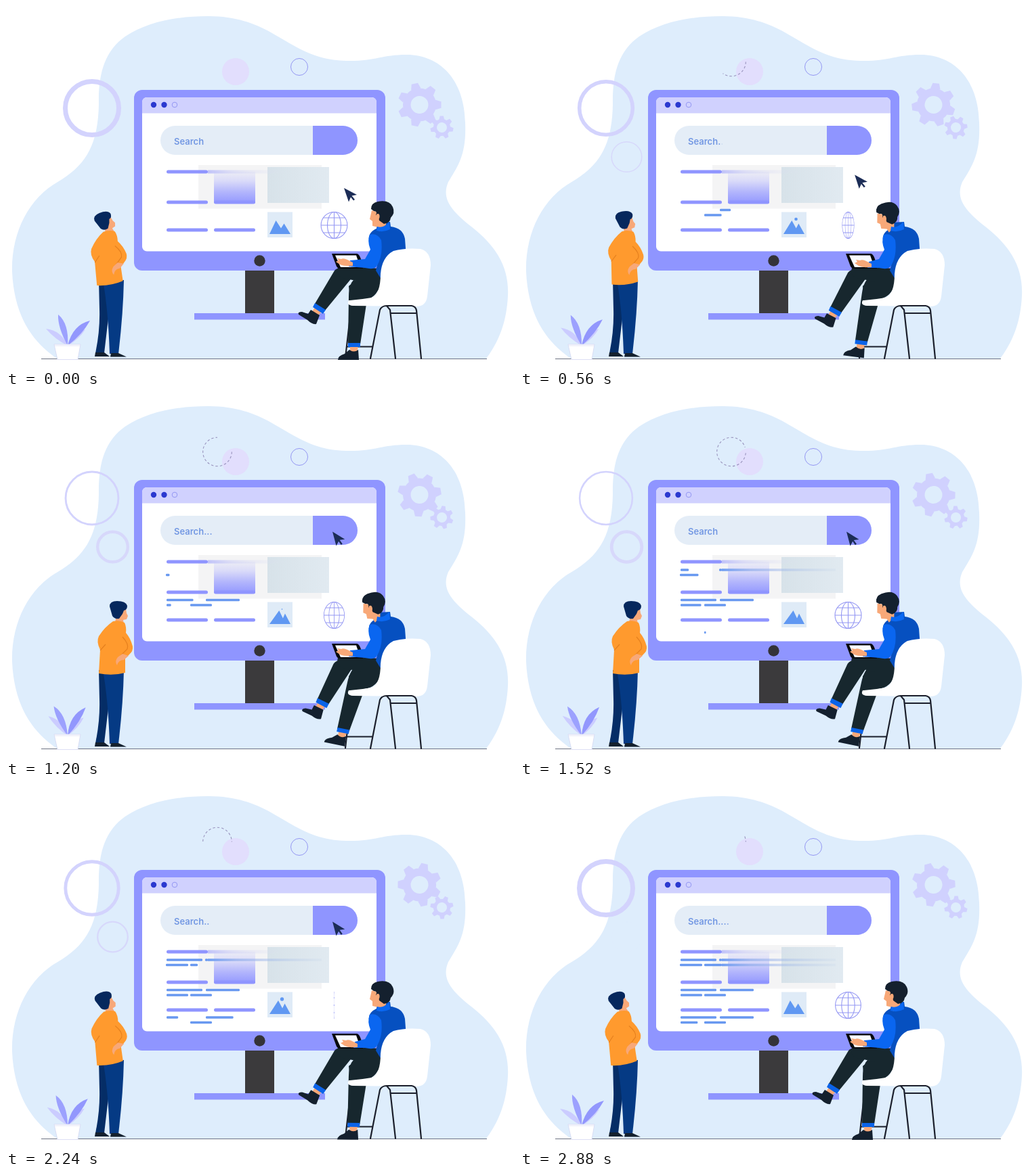
Recreate the animation shown at these times as an HTML page. Size 750 by 535 pixels, loop 2960 ms.

```html
<!DOCTYPE html>
<html lang="en">
<head>
<meta charset="utf-8">
<title>Search illustration</title>
<style>
  html, body { margin: 0; width: 100%; height: 100%; overflow: hidden; background: #fff; }
  svg { display: block; width: 100vw; height: 100vh; }
  .violet { fill: #8f95ff; }
  .lilac { fill: #d0d1fe; }
  .pants { fill: #17272e; }
  .skin { fill: #f8a878; }
  .dark { fill: #14202e; }
  .outline { fill: none; stroke: #9497f3; }
  .frame { fill: none; stroke: #1b1f2b; stroke-width: 2.2; stroke-linecap: round; }
  text { font: 600 13px Inter, "Open Sans", sans-serif; fill: #7398e3; }
</style>
</head>
<body>
<svg viewBox="0 0 750 535">
  <defs>
    <linearGradient id="card" x1="0" y1="0" x2="0" y2="1">
      <stop offset="0" stop-color="#ededf5"/><stop offset=".3" stop-color="#d9daf9"/>
      <stop offset=".65" stop-color="#b2b5fc"/><stop offset="1" stop-color="#9499ff"/>
    </linearGradient>
    <linearGradient id="glass" x1="0" y1="0" x2="1" y2="0">
      <stop offset="0" stop-color="#d7e2e9"/><stop offset="1" stop-color="#e1eaf1"/>
    </linearGradient>
    <linearGradient id="smearViolet" gradientUnits="userSpaceOnUse" x1="298" x2="466" y1="0" y2="0">
      <stop offset="0" stop-color="#b3b6fa" stop-opacity=".8"/>
      <stop offset=".2" stop-color="#cdcff6" stop-opacity=".6"/>
      <stop offset=".7" stop-color="#dfe2ee" stop-opacity="0"/>
    </linearGradient>
    <linearGradient id="smearBlue" gradientUnits="userSpaceOnUse" x1="298" x2="466" y1="0" y2="0">
      <stop offset="0" stop-color="#6e9df2"/><stop offset=".25" stop-color="#90acec" stop-opacity=".7"/>
      <stop offset="1" stop-color="#b8cbe6" stop-opacity=".15"/>
    </linearGradient>
    <clipPath id="field"><rect x="228" y="177" width="291" height="43" rx="21.5"/></clipPath>
    <clipPath id="screen"><rect x="201" y="135" width="346" height="227.5" rx="7"/></clipPath>
  </defs>

  <path fill="#deedfc" d="M75 521C42 498 12 462 9 392C8 335 33 284 78 259C118 235 136 205 137 145C136 100 146 66 176 45C208 24 250 15 299 15C339 15 368 26 391 39C428 60 454 80 502 81C545 82 556 71 596 72C646 75 677 114 678 173C680 220 667 237 653 260C643 283 655 301 687 326C724 355 743 386 741 428C739 472 725 499 709 521Z"/>

  <circle id="bigRing" cx="127" cy="151" fill="none" stroke="#d3d3fd"/>
  <circle id="smallRing" cx="157.5" cy="223" r="22.3" fill="none" stroke="#d7d8fb"/>
  <circle cx="339" cy="97" r="20" fill="#e2defd"/>
  <circle class="outline" cx="433" cy="90" r="12.5"/>
  <path id="dashes" fill="none" stroke="#9893bd" stroke-width="1.1" stroke-dasharray="3.5 3"/>
  <g id="gears"></g>

  <!-- monitor -->
  <rect x="353" y="390" width="43" height="65" fill="#3b3a3c"/>
  <rect class="violet" x="278" y="454" width="193" height="9.5"/>
  <rect class="violet" x="189" y="124" width="371" height="267" rx="12"/>
  <g clip-path="url(#screen)">
    <rect x="201" y="135" width="346" height="228" fill="#fff"/>
    <rect class="lilac" x="201" y="135" width="346" height="23.5"/>
  </g>
  <g fill="#2b39d0"><circle cx="218" cy="146" r="4.2"/><circle cx="233.5" cy="146" r="4.2"/></g>
  <circle class="outline" cx="249" cy="146" r="3.8"/>
  <circle cx="374.5" cy="376.5" r="8.2" fill="#343338"/>
  <g clip-path="url(#field)">
    <rect x="228" y="177" width="291" height="43" fill="#e4edf7"/>
    <rect class="violet" x="453" y="177" width="66" height="43"/>
  </g>
  <text x="248" y="205">Search<tspan>.</tspan><tspan>.</tspan><tspan>.</tspan><tspan>.</tspan></text>

  <rect x="284" y="235" width="182" height="64.5" fill="#f4f4f5"/>
  <rect x="386" y="238" width="91" height="53" fill="url(#glass)"/>
  <rect x="307" y="245" width="61" height="46" fill="url(#card)"/>
  <rect x="298" y="242.5" width="168" height="5" fill="url(#smearViolet)"/>
  <g id="bars" class="violet"></g>
  <g id="lines" fill="#6898f0"></g>

  <rect x="386" y="304.5" width="37" height="37.5" fill="#dfebf7"/>
  <path id="mountains" fill="#6098f2"/>
  <circle id="sun" cx="407.5" cy="315" fill="#6098f2"/>
  <g id="globe" class="outline" stroke-width="1.1">
    <circle r="19.5"/><ellipse rx="10" ry="19.5"/>
    <path d="M0-19.5V19.5M-19.5 0H19.5M-16-11H16M-16 11H16"/>
  </g>
  <path id="cursor" fill="#1c2d57" d="M0 0L19 10L11.5 11.5L16 17L14 18.5L10 13.5L7 20.5Z"/>

  <path d="M52 521.5H710" stroke="#6f7484"/>

  <!-- plant -->
  <g id="leaves"></g>
  <path d="M71 500H110L106 522.5H76Z" fill="#fff" stroke="#d5d7f2" stroke-width=".8"/>
  <path d="M72 502H109" stroke="#e4e5f6"/>

  <!-- standing man -->
  <path fill="#052d66" d="M137 405H155L153 445L145 513H132Q139 480 138 448Z"/>
  <path fill="#053a84" d="M143 405H174Q173 455 166 514H153Q151 450 143 405Z"/>
  <path class="dark" d="M132 512L145 512L153 518H131ZM155 513H166L178 518.5H154Z"/>
  <g id="lean">
    <g id="gaze">
      <path class="skin" d="M163 320L177 314L178 321L180 325L178 330L173 331L174 337L161 337Z"/>
      <path fill="#06285d" d="M153 311Q153 303 164 303Q177 303 179 310Q179 316 174 317L172 322L167 329Q160 330 157 325Z"/>
    </g>
    <path fill="#ff9a2e" d="M158 333Q168 331 175 335Q178 341 177 350Q184 358 187 370Q188 377 182 382L176 388V409Q157 414 137 410L139 375Q133 363 137 355Q146 341 158 333Z"/>
    <path fill="none" stroke="#e6801e" stroke-width="1.2" d="M172 356Q182 367 179 374L169 384M139 376L147 367"/>
    <path class="skin" d="M172 381L181 384L174 390Q166 390 164 398Q160 392 165 386Z"/>
  </g>

  <!-- seated man -->
  <path class="frame" d="M510 442L501 520M503 503.5H541"/>
  <g id="standingLeg">
    <path class="skin" d="M508 499H521L518 512H508Z"/>
    <path class="pants" d="M513 405L553 408Q550 428 533 434L523 500H505L506 430Q506 412 513 405Z"/>
    <path d="M505 498H523V504H505Z" fill="#0b63e8"/>
    <path class="dark" d="M507 508Q514 513 520 508L521 523H490Q490 517 500 514Z"/>
  </g>
  <g id="crossedLeg">
    <path class="skin" d="M459 441L469 449L461 457L451 453Z"/>
    <path class="pants" d="M485 391Q491 384 505 389L512 400L471 450L456 440Z"/>
    <path d="M456 439L472 449L468 455L453 445Z" fill="#0b63e8"/>
    <path class="dark" d="M450 449L463 457L458 470Q452 471 445 464L432 456Q430 452 437 452L446 455Z"/>
  </g>
  <path class="pants" d="M490 387Q520 383 555 389L557 410Q546 432 508 434L506 414Q516 404 532 409L502 403Q486 400 490 387Z"/>
  <path d="M481 366H518Q524 367 527 388H492Q490 388 488 385Z" fill="#080a0e"/>
  <path d="M486 368.5H517L523 386H494Z" fill="#f9fbff"/>
  <path fill="#0650c0" d="M549 320L567 319L568 326Q586 328 589 344L591 372L556 407L546 391L550 375L536 346Q534 335 547 329Z"/>
  <g id="head">
    <path class="skin" d="M540 302L537 315L541 318L541 325L549 327L551 333L560 327L564 310Z"/>
    <path class="dark" d="M539 300Q539 291 549 289Q566 286 571 297Q575 306 568 313Q567 321 558 322L551 317L550 310L546 309Q549 303 543 303Z"/>
    <ellipse class="skin" cx="549" cy="311" rx="2.6" ry="4"/>
  </g>
  <path fill="#0a68f2" d="M548 326Q557 329 566 319L567 330Q557 335 547 332Z"/>
  <path id="sleeve" fill="#0a66f0"/>
  <path id="hand" class="skin" d="M15 1L7-3Q1-6-2-4L-8-5L-6-2L-10 0L-4 4Q3 7 15 6Z"/>
  <path fill="#fff" d="M572 362Q590 357 612 359Q627 363 627 383L622 429Q620 444 606 444L512 443Q502 442 506 435Q523 434 540 431Q553 425 553 396Q555 371 572 362Z"/>
  <path class="frame" d="M538 521L552 449Q555 443 562 443L567 449L575 521M562 443H599Q605 444 606 450L613 521M568 454H606"/>
</svg>

<script>
const LOOP = 2960, STEP = 80;
const $ = id => document.getElementById(id);
const set = (el, attrs) => { for (const k in attrs) el.setAttribute(k, attrs[k]); };
const add = (parent, tag, attrs) => {
  const el = document.createElementNS('http://www.w3.org/2000/svg', tag);
  set(el, attrs);
  return parent.appendChild(el);
};
const ramp = (t, a, b) => Math.min(1, Math.max(0, (t - a) / (b - a)));
const ease = (t, a, b) => { const u = ramp(t, a, b); return u * u * (3 - 2 * u); };
const wave = (t, period) => (1 - Math.cos(2 * Math.PI * t / period)) / 2;
const pose = (el, angle, x, y, dx = 0, dy = 0) =>
  el.setAttribute('transform', `translate(${dx} ${dy}) rotate(${angle} ${x} ${y})`);

function makeGear(x, y, hole, body, tip) {
  const g = add($('gears'), 'g', {});
  add(g, 'circle', { r: (hole + body) / 2, fill: 'none', stroke: '#d0d1fe', 'stroke-width': body - hole });
  const w = tip * .2;
  for (let i = 0; i < 7; i++)
    add(g, 'path', {
      class: 'lilac', transform: `rotate(${i * 360 / 7})`,
      d: `M${body - 1} ${-w * 1.15}L${tip} ${-w * .75}V${w * .75}L${body - 1} ${w * 1.15}Z`
    });
  return angle => g.setAttribute('transform', `translate(${x} ${y}) rotate(${angle})`);
}
const turnBig = makeGear(610.5, 146, 13, 24.5, 32);
const turnSmall = makeGear(643.5, 179.5, 7.5, 12.5, 17);

for (const [x, y] of [[237, 245], [237, 290], [307, 290], [237, 331], [307, 331]])
  add($('bars'), 'rect', { x, y: y - 2.5, width: 61, height: 5, rx: 2.5 });

// x, y, full width, start, end
const lines = [
  [272, 309, 32, 200, 650], [295, 301.5, 50, 360, 980],
  [237, 301.5, 53, 670, 1380], [237, 309, 32, 1110, 1540],
  [236, 264.5, 33, 1120, 1600], [294, 257, 51, 1320, 1840],
  [237, 257, 53, 1360, 2060], [272, 264.5, 32, 2080, 2540],
  [272, 349.5, 32, 1480, 1980], [295, 342, 50, 1720, 2360],
  [237, 342, 53, 2020, 2700], [237, 349.5, 32, 2500, 2980]
].map(([x, y, full, start, end]) => {
  const rect = add($('lines'), 'rect', { x, y: y - 1.8, height: 3.6, rx: 1.4 });
  const smear = y < 270 && x > 270 &&
    add($('lines'), 'rect', { x: 298, y: y - 1.8, width: 168, height: 3.6, fill: 'url(#smearBlue)' });
  return t => {
    const w = full * ramp(t, start, end);
    rect.setAttribute('width', smear ? Math.min(w, 298 - x) : w);
    if (smear) smear.setAttribute('opacity', ramp(w, 298 - x - 1, 298 - x + 5));
  };
});

// tip x, tip y, half width, sway, colour
const leaves = [
  [59, 477, 8, 8, '#cbccff'], [117, 478, 8, -6, '#cbccff'],
  [77, 456, 9, -9, '#9ca1fe'], [124, 465, 10, -10, '#9297fd']
].map(([x, y, w, sway, fill]) => {
  const dx = x - 91, dy = y - 502, len = Math.hypot(dx, dy);
  const nx = -dy / len * w, ny = dx / len * w, mx = 91 + dx * .45, my = 502 + dy * .65;
  const leaf = add($('leaves'), 'path', {
    fill, d: `M91 502Q${mx + nx} ${my + ny} ${x} ${y}Q${mx - nx} ${my - ny} 91 502Z`
  });
  return p => pose(leaf, sway * p, 91, 502);
});

const dots = [...document.querySelectorAll('tspan')];
const dotStarts = [200, 540, 940, 1300];

function drawDashes(t) {
  const from = Math.max(0, (t - 1500) * .245), to = Math.min(360, t * .225);
  const at = a => {
    const r = a * Math.PI / 180;
    return `${312 + 21.3 * Math.cos(r)} ${82.5 + 21.3 * Math.sin(r)}`;
  };
  const mid = (from + to) / 2;
  $('dashes').setAttribute('d', to > from
    ? `M${at(from)}A21.3 21.3 0 0 1 ${at(mid)}A21.3 21.3 0 0 1 ${at(to)}` : '');
}

function draw(t) {
  const half = t % (LOOP / 2), slow = wave(t, LOOP), fast = wave(t, LOOP / 2);

  set($('bigRing'), { r: 39.5 - slow * .6, 'stroke-width': 7 - 4.5 * slow });
  set($('smallRing'), { 'stroke-width': 4.8 * slow });
  drawDashes(t);
  const turn = t / LOOP * 720 / 7;
  turnBig(turn);
  turnSmall(12 - turn);

  dots.forEach((dot, i) => dot.setAttribute('fill-opacity', ramp(half, dotStarts[i], dotStarts[i] + 120)));
  lines.forEach(grow => grow(t));
  leaves.forEach(sway => sway(slow));

  const k = 5 * Math.sqrt(slow);
  $('mountains').setAttribute('d', `M389 337L${398.5 + k} 317L${406 + k * .6} 328.5L${410.5 + k * .3} 321.5L420 337Z`);
  $('sun').setAttribute('r', 2.7 * fast);
  const spin = Math.abs(Math.cos(2 * Math.PI * (t - 40) / LOOP));
  $('globe').setAttribute('transform', `translate(484.5 324) scale(${Math.max(spin, .02)} 1)`);

  const move = ease(t, 320, 1000), press = wave(ramp(t, 1440, 2240), 1);
  set($('cursor'), {
    transform: `translate(${499 - 17 * move} ${269 - 68.5 * move}) rotate(${4 * move}) scale(${1 + .13 * press})`,
    visibility: t < 2560 ? 'visible' : 'hidden'
  });

  const lean = 1 - ease(t, 320, 820) + ease(t, 1780, 2300);
  pose($('lean'), -8.5 * lean, 156, 430);
  pose($('gaze'), -14 * lean, 167, 335);

  const nod = ease(t, 160, 560) - ease(t, 1800, 2200);
  pose($('head'), -12 * nod, 556, 325, -8 * nod, nod);
  const swing = ease(t, 150, 850) - ease(t, 1680, 2320);
  pose($('standingLeg'), 11.5 * swing, 522, 418, 0, -3 * swing);
  pose($('crossedLeg'), -6 * swing, 492, 395, -swing, 4 * swing);

  const tap = ease(half, 100, 340) - ease(half, 900, 1180);
  const hx = 497 + 7 * tap, hy = 378 + 2 * tap;
  $('hand').setAttribute('transform', `translate(${hx} ${hy})`);
  $('sleeve').setAttribute('d', `M537 338Q548 335 554 346Q557 370 547 385Q543 390 530 387L${hx + 9} ${hy + 7}L${hx + 11} ${hy - 2}L530 374L538 360Q533 348 537 338Z`);
}

const begin = performance.now();
function tick() {
  const t = (performance.now() - begin) % LOOP;
  draw(Math.floor(t / STEP) * STEP);
  requestAnimationFrame(tick);
}
tick();
</script>
</body>
</html>
```
